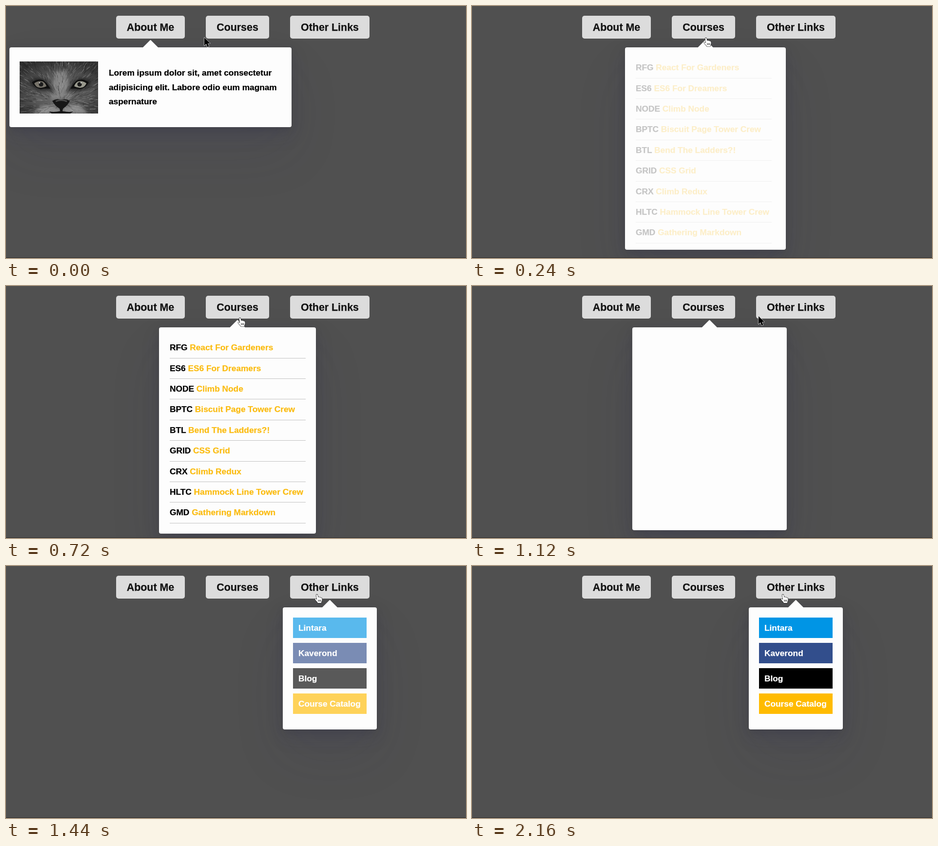
An HTML page that plays this animation: 944x518 px, repeating every 2400 ms.

```html
<!DOCTYPE html>
<html lang="en">
<head>
<meta charset="utf-8">
<title>Follow-along dropdown</title>
<style>
  html, body { margin: 0; width: 100%; height: 100%; overflow: hidden; background: #505050; }
  #stage {
    position: relative; width: 944px; height: 518px; overflow: hidden;
    font: bold 17.3px "Liberation Sans", Arial, sans-serif; color: #000; white-space: nowrap;
    -webkit-text-stroke: .25px; paint-order: stroke; stroke-linejoin: round;
  }
  #stage::after { content: ""; position: absolute; left: 0; top: 517px; width: 944px; height: 1px; background: #2b2b2b; }
  #stage > *, .drop > * { position: absolute; }
  #panel {
    left: 0; top: 85px; background: #fdfdfd; border-radius: 4px;
    box-shadow: 0 53px 107px rgba(50,50,93,.1), 0 16px 37px rgba(50,50,93,.15), 0 5px 16px rgba(0,0,0,.1);
  }
  #panel::before {
    content: ""; position: absolute; left: 50%; top: -15.5px; width: 32px; height: 16px; margin-left: -16px;
    background: #fdfdfd; clip-path: polygon(50% 0, 100% 100%, 0 100%);
  }
  .button {
    top: 20px; height: 47px; border-radius: 5px; background: #dcdcdc; color: #111;
    font-size: 21.4px; line-height: 49px; text-align: center;
  }
  .drop { left: 0; top: 0; }
  .bio { left: 211px; top: 123.3px; margin: 0; line-height: 29.3px; }
  .photo { left: 28px; top: 114px; }
  .course { left: 336px; width: 279px; height: 41.4px; line-height: 41.4px; border-bottom: 1px solid #c2c2c2; }
  .course span { color: #fbbc12; }
  .link { left: 589px; width: 140px; height: 41.5px; padding-left: 11px; line-height: 42px; color: #fff; }
  #cursor { left: 0; top: 0; overflow: visible; }
</style>
</head>
<body>
<div id="stage">
  <div id="panel"></div>
  <div class="button" style="left:226px;width:141px">About Me</div>
  <div class="button" style="left:410px;width:130px">Courses</div>
  <div class="button" style="left:583px;width:163px">Other Links</div>

  <div class="drop">
    <svg class="photo" width="161" height="107">
      <defs>
        <radialGradient id="fur" cx=".52" cy=".6" r=".65">
          <stop offset="0" stop-color="#707070"/><stop offset=".55" stop-color="#565656"/><stop offset="1" stop-color="#303030"/>
        </radialGradient>
        <filter id="soft"><feGaussianBlur stdDeviation="3"/></filter>
        <g id="eye">
          <path d="M-24-6Q-4-20 14-6L32 22L18 14Q0 18-18 8Z" fill="#1c1c1c" opacity=".75" filter="url(#soft)"/>
          <path d="M-18-3Q-8-11 4-8Q12-5 20 10Q8 9 0 11Q-11 9-18-3Z" fill="#101010"/>
          <path d="M-13-1Q-6-7 4-5Q10-2 12 5Q2 10-6 7Q-11 4-13-1Z" fill="currentColor"/>
          <circle cx="1" cy="1" r="4.6" fill="#1b1b1b"/>
          <circle cx="-2" cy="-2" r="1.2" fill="#ccc"/>
        </g>
      </defs>
      <rect width="161" height="107" fill="url(#fur)"/>
      <g filter="url(#soft)">
        <path d="M74 20H94L106 80Q85 70 64 80Z" fill="#858585"/>
        <path d="M28 107Q50 78 80 97H90Q118 78 140 107Z" fill="#8c8c8c"/>
      </g>
      <g id="hairs" stroke-width="1"></g>
      <use href="#eye" x="43" y="46" color="#77736a"/>
      <use href="#eye" transform="translate(124 46) scale(-1 1)" color="#9a9a8e"/>
      <path d="M67 81Q76 75 85 79Q94 75 103 81Q99 90 89 97L88 102Q98 105 110 103L104 107H66L60 103Q72 105 83 102L82 97Q71 90 67 81Z" fill="#161616"/>
      <path d="M74 82Q85 77 97 82" fill="none" stroke="#4c4c4c" stroke-width="3"/>
    </svg>
    <p class="bio">Lorem ipsum dolor sit, amet consectetur<br>adipisicing elit. Labore odio eum magnam<br>aspernature</p>
  </div>
  <div class="drop" id="courses"></div>
  <div class="drop" id="links"></div>

  <svg id="cursor" width="1" height="1">
    <path id="arrow" d="M0 0V16.5L3.8 13L6.5 19.2L9.5 17.9L6.9 11.8H12Z" fill="#000" stroke="#fff" stroke-width="1.1" stroke-linejoin="round"/>
    <g id="hand" stroke="#000" stroke-width="1.1" stroke-linejoin="round">
      <path d="M-1.6 1.6Q-1.4 .3 0 .4Q1.3 .5 1.5 1.8L2.4 6.2Q4.2 5 5.2 6.6Q7 5.7 7.9 7.4Q10.2 6.8 10.5 9Q11 13 9.5 15L9 18H1.8Q.6 15.6-1.5 13.6Q-4 11.2-3.9 10.2Q-3 8.6-1.2 9.9L.2 11Z" fill="#fff"/>
      <path d="M3 11.5V15M5.3 11.5V15M7.6 11.5V15" stroke-width=".9"/>
    </g>
  </svg>
</div>
<script>
const $ = id => document.getElementById(id);
const LOOP = 2400, STEP = 80;

const courses = [
  ["RFG", "React For Gardeners"], ["ES6", "ES6 For Dreamers"], ["NODE", "Climb Node"],
  ["BPTC", "Biscuit Page Tower Crew"], ["BTL", "Bend The Ladders?!"], ["GRID", "CSS Grid"],
  ["CRX", "Climb Redux"], ["HLTC", "Hammock Line Tower Crew"], ["GMD", "Gathering Markdown"]
];
const links = [["Lintara", "#0095e5"], ["Kaverond", "#324e8c"], ["Blog", "#000"], ["Course Catalog", "#fb0"]];

$("courses").innerHTML = courses.map(([code, title], i) =>
  `<div class="course" style="top:${106.2 + i * 42.4}px">${code} <span>${title}</span></div>`).join("");
$("links").innerHTML = links.map(([name, color], i) =>
  `<div class="link" style="top:${106 + i * 52}px;background:${color}">${name}</div>`).join("");

// Fur: short hairs pointing away from the nose
let seed = 7;
const random = () => (seed = seed * 16807 % 2147483647) / 2147483647;
let hairs = "";
for (let i = 0; i < 700; i++) {
  const x = random() * 161, y = random() * 107, a = Math.atan2(y - 85, x - 85) + random() * .6 - .3;
  const n = 4 + random() * 9, shade = random() < .45 ? "#b0b0b0" : "#151515";
  hairs += `<path d="M${x} ${y}l${n * Math.cos(a)} ${n * Math.sin(a)}" stroke="${shade}" opacity="${.15 + random() * .35}"/>`;
}
$("hairs").innerHTML = hairs;

// Panel stops: time of entering the button, then left, width, height
const stops = [
  { at: -1000, x: 7, w: 579, h: 164 },
  { at: 8, x: 314, w: 322, h: 424 },
  { at: 1103, x: 568, w: 193, h: 251 }
];
const track = [
  [0, 407, 65], [80, 444, 66], [160, 472, 66], [240, 480, 65], [880, 480, 65],
  [1040, 534, 64], [1120, 588, 62], [1200, 618, 60], [1280, 634, 59], [1360, 638, 58], [LOOP, 638, 58]
];
const drops = document.querySelectorAll(".drop");
const mix = (a, b, p) => a + (b - a) * p;

// CSS "ease": cubic-bezier(.25, .1, .25, 1)
function ease(p) {
  if (p <= 0) return 0;
  if (p >= 1) return 1;
  let lo = 0, hi = 1, s = .5;
  for (let i = 0; i < 24; i++) {
    s = (lo + hi) / 2;
    if (.75 * s * (1 - s) + s ** 3 < p) lo = s; else hi = s;
  }
  return .3 * s * (1 - s) ** 2 + 3 * s * s * (1 - s) + s ** 3;
}

function drawPanel(t) {
  const now = t < stops[1].at ? 0 : t < stops[2].at ? 1 : 2;
  const to = stops[now], from = stops[Math.max(0, now - 1)], age = t - to.at;
  const size = ease(age / 300), style = $("panel").style;
  style.width = mix(from.w, to.w, size) + "px";
  style.height = mix(from.h, to.h, size) + "px";
  style.transform = `translateX(${mix(from.x, to.x, ease(age / 230))}px)`;
  drops.forEach((drop, i) => drop.style.opacity = i === now ? ease((age - 150) / 500) : 0);
}

function drawCursor(t) {
  const i = track.findIndex(k => k[0] > t), [t0, x0, y0] = track[i - 1], [t1, x1, y1] = track[i];
  const p = (t - t0) / (t1 - t0), x = mix(x0, x1, p), y = mix(y0, y1, p);
  const over = x > 416 && x < 540 || x > 590;
  $("cursor").style.transform = `translate(${x}px,${y}px)`;
  $("hand").style.display = over ? "" : "none";
  $("arrow").style.display = over ? "none" : "";
}

const start = performance.now();
function draw() {
  // The picture advances in steps, like a screen recording
  const t = Math.floor((performance.now() - start) % LOOP / STEP) * STEP;
  drawPanel(t);
  drawCursor(t);
  requestAnimationFrame(draw);
}
draw();
</script>
</body>
</html>
```
